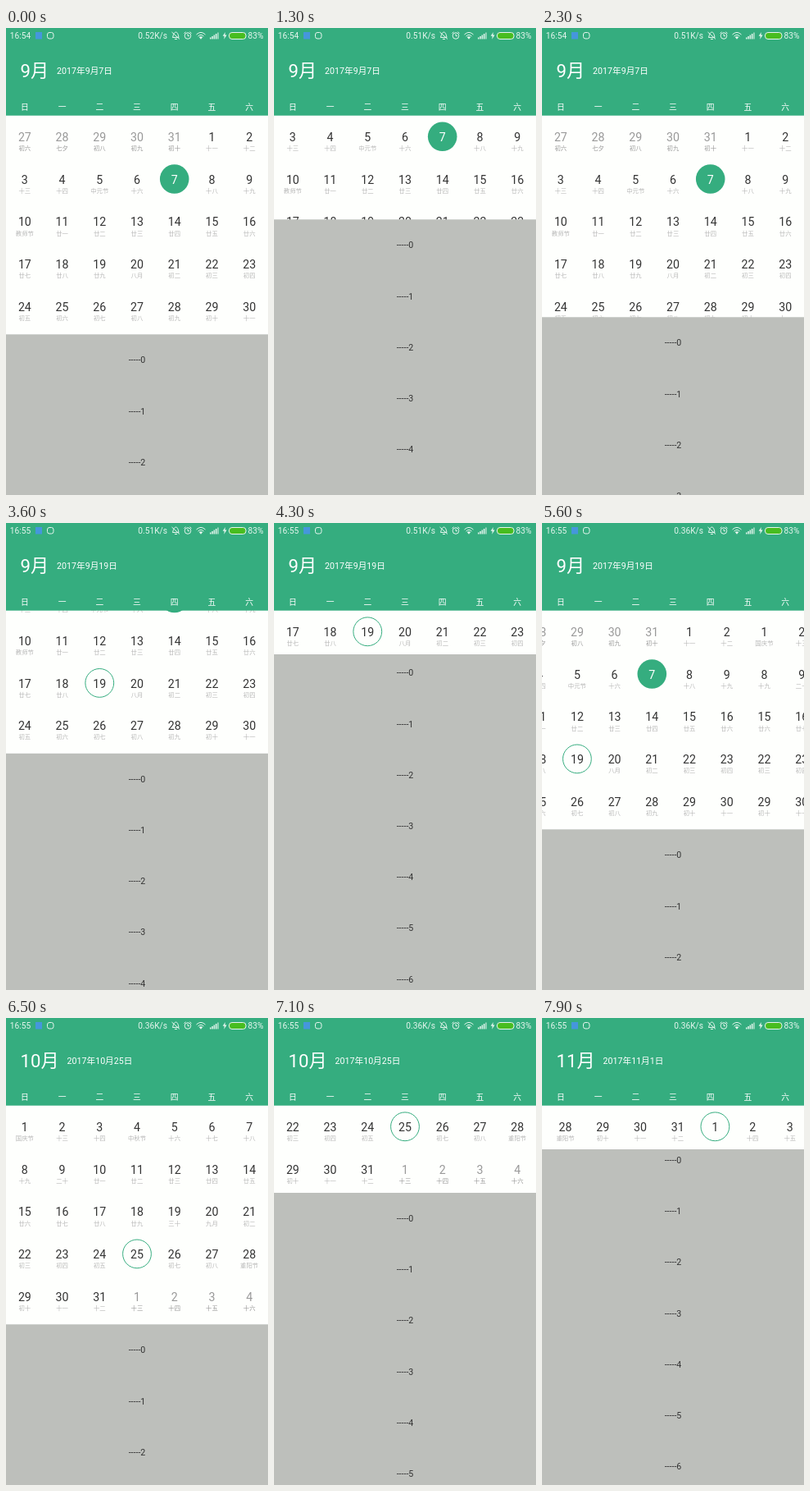
Animation of 320x569 px, one loop 8000 ms. Source, as an HTML page with a canvas:

```html
<!DOCTYPE html>
<html lang="zh-CN">
<head>
<meta charset="utf-8">
<title>Calendar</title>
<style>
html, body { margin: 0; width: 100%; height: 100%; overflow: hidden; background: #bdbfbb; }
canvas { display: block; width: 320px; height: 569px; }
</style>
</head>
<body>
<canvas id="stage"></canvas>
<script>
const W = 320, H = 569, LOOP = 8000, STEP = 100;
const GREEN = '#35ad7f', PAPER = '#fefffd', LIST = '#bdbfbb', INK = '#333';
const HEADER = 106.7, WEEK = 53.3, MONTH = 266.6, TRAVEL = MONTH - WEEK;
const COL = W / 7, ROW = 51.7, ITEM = 62.22;
const FONT = "Roboto, 'Noto Sans CJK SC', 'Noto Sans CJK', sans-serif";

const canvas = document.getElementById('stage');
const scale = window.devicePixelRatio || 1;
canvas.width = W * scale;
canvas.height = H * scale;
const ctx = canvas.getContext('2d');

// Keys are [time, value] pairs. Drag is the finger travel: it first folds the month, then scrolls the list.
const DRAG = [[900, 0], [1000, 15], [1300, 140], [1500, 213], [1800, 230], [1900, 212], [2000, 175],
  [2300, 21], [2500, 0], [3300, 0], [3400, 15], [3800, 170], [4000, 215], [4200, 228], [4300, 222],
  [4400, 200], [4800, 50], [5100, 0], [6700, 0], [6800, 18], [7100, 160.3], [7300, 215], [7500, 231.4]];
const MONTH_SWIPE = [[5500, 0], [5600, 71.4], [5700, 160], [5800, 240], [5900, 288], [6000, 310], [6200, 320]];
const WEEK_SWIPE = [[7700, 0], [7800, 104], [7900, 268.6]];

function track(keys, t) {
  if (t <= keys[0][0]) return keys[0][1];
  for (let i = 1; i < keys.length; i++) {
    const [t0, a] = keys[i - 1], [t1, b] = keys[i];
    if (t <= t1) return a + (b - a) * (t - t0) / (t1 - t0);
  }
  return keys[keys.length - 1][1];
}

const day = (month, date) => new Date(2017, month - 1, date);
const TODAY = day(9, 7);
const same = (a, b) => a.getTime() === b.getTime();

function selectedAt(t) {
  if (t < 3000) return TODAY;
  if (t < 5800) return day(9, 19);
  if (t < 6500) return day(10, 19);
  return t < 7900 ? day(10, 25) : day(11, 1);
}

const FESTIVALS = { '8/28': '七夕', '9/5': '中元节', '9/10': '教师节', '9/20': '八月',
  '10/1': '国庆节', '10/4': '中秋节', '10/20': '九月', '10/28': '重阳节' };

function lunar(date) {
  const festival = FESTIVALS[date.getMonth() + 1 + '/' + date.getDate()];
  if (festival) return festival;
  // The lunar months here begin on 22 August, 20 September and 20 October.
  let n = Math.round((date - day(8, 22)) / 864e5);
  n -= n >= 59 ? 59 : n >= 29 ? 29 : 0;
  if (n === 19) return '二十';
  if (n === 29) return '三十';
  return '初十廿'[Math.floor(n / 10)] + '一二三四五六七八九十'[n % 10];
}

function text(str, x, y, size, color, align = 'left') {
  ctx.font = `${size}px ${FONT}`;
  ctx.textAlign = align;
  ctx.fillStyle = color;
  ctx.fillText(str, x, y);
  return ctx.measureText(str).width;
}

function rect(x, y, w, h, color) {
  ctx.fillStyle = color;
  ctx.fillRect(x, y, w, h);
}

function path(d, color, fill) {
  const p = new Path2D(d);
  ctx.lineWidth = 1;
  ctx.fillStyle = ctx.strokeStyle = color;
  fill ? ctx.fill(p) : ctx.stroke(p);
}

function disc(x, y, r, color, fill) {
  ctx.beginPath();
  ctx.arc(x, y, r, 0, 7);
  ctx.lineWidth = 1;
  ctx.fillStyle = ctx.strokeStyle = color;
  fill ? ctx.fill() : ctx.stroke();
}

function drawDay(date, x, y, selected, faded) {
  const today = same(date, TODAY), marked = today || same(date, selected);
  if (marked) disc(x, y, today ? 17.8 : 17.4, GREEN, today);
  text(date.getDate(), x, y + 5.6, 14.2, today ? '#fff' : faded ? '#999' : INK, 'center');
  if (!marked) text(lunar(date), x, y + 16.8, 7.4, faded ? '#999' : '#b8b8b8', 'center');
}

// Without a month, every day is drawn as current.
function drawPage(start, rows, left, top, selected, month) {
  for (let i = 0; i < rows * 7; i++) {
    const date = day(start.getMonth() + 1, start.getDate() + i);
    const faded = month !== undefined && date.getMonth() + 1 !== month;
    drawDay(date, left + (i % 7 + .5) * COL, top + 25.6 + Math.floor(i / 7) * ROW, selected, faded);
  }
}

function drawMonth(month, left, top, selected) {
  const start = day(month, 1 - day(month, 1).getDay());
  drawPage(start, 5, left, top, selected, month);
}

function drawStatus(t) {
  const pale = '#e6f5ee';
  const speed = t < 700 ? '0.52' : t < 4800 ? '0.51' : '0.36';
  text(t < 3400 ? '16:54' : '16:55', 4.8, 13.1, 10.2, pale);
  text(speed + 'K/s', 197, 13.1, 10.2, pale, 'right');
  text('83%', 295.5, 13.1, 10.2, pale);
  rect(36, 5, 8, 8.5, '#4597dc');
  ctx.beginPath();
  ctx.roundRect(50.5, 5.5, 7.5, 7.5, 2.5);
  ctx.lineWidth = 1;
  ctx.strokeStyle = pale;
  ctx.stroke();

  // Muted bell and alarm clock
  path('M203.5 11.5Q205 5 207.5 5Q210 5 211 11.5ZM206 13.5H209M202.5 5L212 13.5', pale);
  disc(222, 9.5, 3.8, pale);
  path('M222 7.2V9.7H224M217.5 6.5L219.5 4.7M226.5 6.5L224.5 4.7', pale);

  // Wi-Fi, signal and charging bolt
  path('M232.5 8Q238 2.8 243.5 8M234.5 10Q238 6.8 241.5 10', pale);
  path('M235.7 11L238 13.8L240.3 11Q238 9.5 235.7 11Z', pale, true);
  for (let i = 0; i < 5; i++) rect(249 + i * 2.3, 11.5 - i * 1.5, 1.5, 2 + i * 1.5, i < 4 ? pale : '#b4dfcc');
  path('M267.8 5L264.7 9.8H266.8L266.2 13.8L269.6 8.5H267.4Z', pale, true);

  ctx.beginPath();
  ctx.roundRect(272.5, 5.5, 20.5, 8, 3.5);
  ctx.fillStyle = '#48bd20';
  ctx.fill();
  ctx.strokeStyle = pale;
  ctx.stroke();
}

function drawHeader(t, selected) {
  rect(0, 0, W, HEADER, GREEN);
  drawStatus(t);
  const month = selected.getMonth() + 1;
  const width = text(month + '月', 17.6, 59.8, 22.2, '#fff');
  text(`2017年${month}月${selected.getDate()}日`, 27.4 + width, 56, 10.67, '#fff');
  [...'日一二三四五六'].forEach((name, i) => text(name, (i + .5) * COL, 99.6, 9.8, '#fff', 'center'));
}

function drawCalendar(t, folded, selected) {
  if (t > 7500) {
    const swipe = track(WEEK_SWIPE, t);
    drawPage(day(10, 22), 1, -swipe, HEADER, selected);
    drawPage(day(10, 29), 1, W - swipe, HEADER, selected);
    return;
  }
  const firstWeekday = day(selected.getMonth() + 1, 1).getDay();
  const limit = Math.floor((selected.getDate() - 1 + firstWeekday) / 7) * ROW;
  const opening = t > 1800 && t < 2900 || t > 4200 && t < 5500;
  const shift = opening ? Math.max(0, limit - (TRAVEL - folded)) : Math.min(limit, folded);
  const swipe = track(MONTH_SWIPE, t);
  drawMonth(9, -swipe, HEADER - shift, selected);
  drawMonth(10, W - swipe, HEADER - shift, selected);
}

function drawList(top, scroll) {
  rect(0, top, W, H - top, LIST);
  for (let i = 0; i < 8; i++) {
    text('-----' + i, W / 2, top + ITEM * (i + .5) - scroll + 3.9, 10.67, INK, 'center');
  }
}

function draw(t) {
  const selected = selectedAt(t), drag = track(DRAG, t);
  const folded = Math.min(drag, TRAVEL);
  ctx.setTransform(scale, 0, 0, scale, 0, 0);
  rect(0, 0, W, H, PAPER);
  drawCalendar(t, folded, selected);
  drawList(HEADER + MONTH - folded, drag - folded);
  drawHeader(t, selected);
}

function frame() {
  // The screen advances ten times a second.
  draw(Math.floor(performance.now() % LOOP / STEP) * STEP);
  requestAnimationFrame(frame);
}
frame();
</script>
</body>
</html>
```
